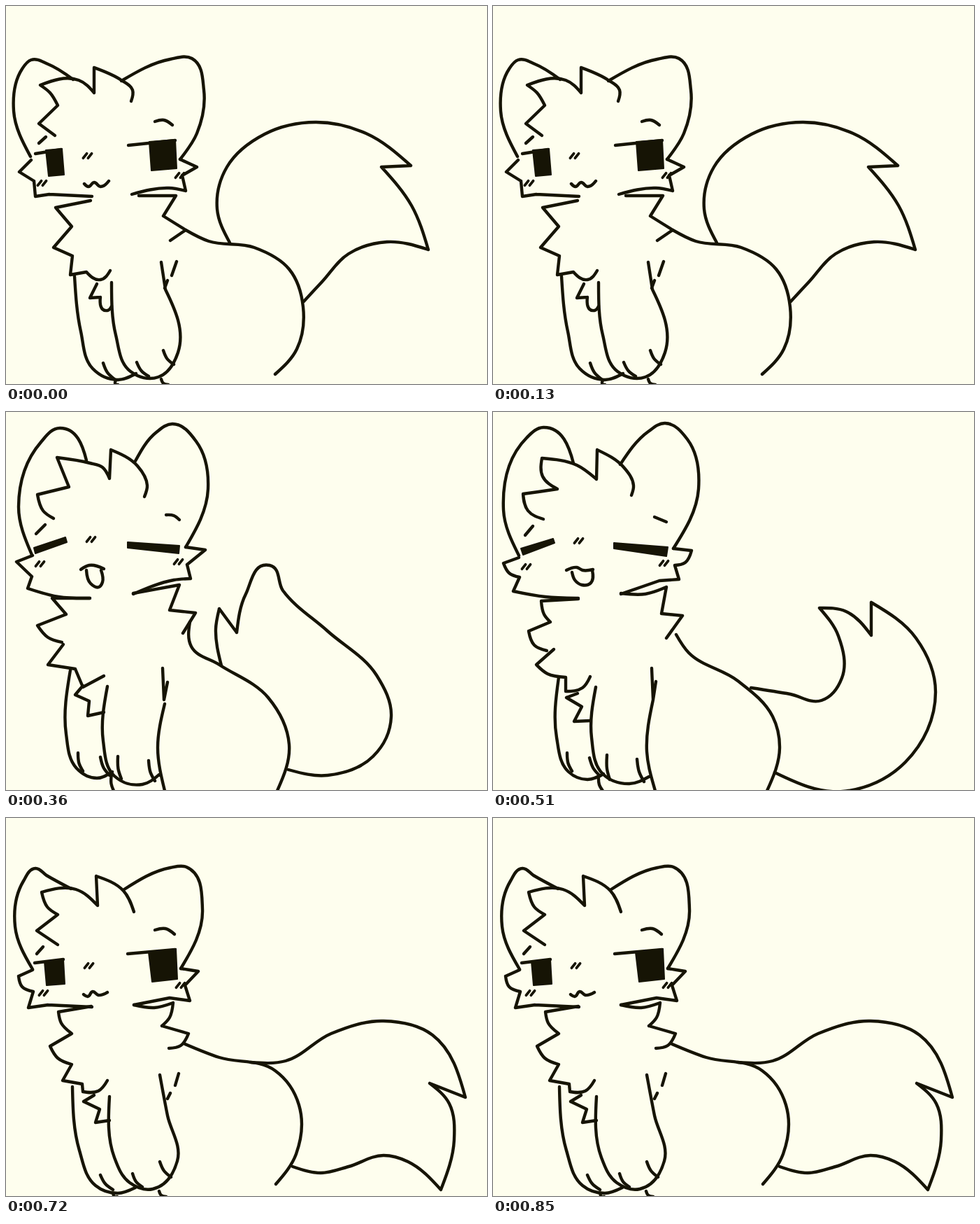
Recreate the animation shown at these times as an HTML page. Size 688x540 px, loop 0.93 s.

```html
<!DOCTYPE html>
<html lang="en">
<head>
<meta charset="utf-8">
<title>Wagging cat</title>
<style>
html, body { margin: 0; width: 100%; height: 100%; overflow: hidden; background: #fefeee; }
svg { display: block; width: 688px; height: 540px; }
path { fill: none; stroke: #161405; stroke-width: 4.4; stroke-linecap: round; stroke-linejoin: round; }
.thin { stroke-width: 3.8; }
.solid { fill: #161405; stroke-width: 2; }
</style>
</head>
<body>
<svg id="stage" viewBox="0 0 688 540"></svg>
<script>
const svgNS = "http://www.w3.org/2000/svg";
const stage = document.getElementById("stage");
const holds = [220, 140, 150, 210, 210];
const loop = holds.reduce((sum, hold) => sum + hold);

function add(parent, tag, attrs = {}) {
  const el = parent.appendChild(document.createElementNS(svgNS, tag));
  for (const key in attrs) el.setAttribute(key, attrs[key]);
  return el;
}

const views = holds.map(() => add(stage, "g"));

const mix = (a, m, b, n) => [a[0] * m + b[0] * n, a[1] * m + b[1] * n];
const dot = (a, b) => a[0] * b[0] + a[1] * b[1];
const size = a => Math.hypot(a[0], a[1]);
const unit = a => mix(a, 1 / (size(a) || 1), a, 0);
const read = text => text.trim().split(" ").map(word => word.split(",").map(Number));

// Round curve through a run of points, close to circular arcs.
function arc(pts) {
  const steps = pts.slice(1).map((p, i) => mix(p, 1, pts[i], -1));
  const lens = steps.map(size), dirs = steps.map(unit), end = dirs.length;
  const tans = pts.map((p, i) => {
    if (i === 0 || i === end) return null;
    return unit(mix(dirs[i - 1], Math.sqrt(lens[i]), dirs[i], Math.sqrt(lens[i - 1])));
  });
  const outer = (dir, tan) => tan ? unit(mix(dir, 1 + 2 * dot(dir, tan), tan, -1)) : dir;
  tans[0] = outer(dirs[0], tans[1]);
  tans[end] = outer(dirs[end - 1], end > 1 ? tans[end - 1] : null);
  const reach = (i, tan) => lens[i] * 2 / 3 / (1 + Math.max(0, dot(dirs[i], tan)));
  return "M" + pts[0] + dirs.map((dir, i) => {
    const a = mix(pts[i], 1, tans[i], reach(i, tans[i]));
    const b = mix(pts[i + 1], 1, tans[i + 1], -reach(i, tans[i + 1]));
    return "C" + [...a, ...b, ...pts[i + 1]].map(n => n.toFixed(1)).join(" ");
  }).join("");
}

// A star after a point makes a sharp tip there.
function curve(stroke) {
  const runs = stroke.split("*").map(read);
  return runs.map((run, i) => arc(i ? [runs[i - 1].at(-1), ...run] : run)).join("");
}

const polygon = stroke => "M" + stroke.trim().split(" ").join("L") + "Z";

// Two ends with a slight sag between them.
function bow(stroke) {
  const [a, b] = read(stroke);
  const mid = mix(a, 0.5, b, 0.5);
  return arc([a, [mid[0] - 2, mid[1] + 2], b]);
}

// A pair of small slanted dashes.
function dashes(stroke) {
  const [x, y] = read(stroke)[0];
  return [x, x + 7].map(cx => `M${cx + 2.5} ${y - 3.2}L${cx - 2.5} ${y + 3.2}`).join("");
}

// One text per pose; "|" separates strokes.
function part(shape, look, texts) {
  texts.forEach((text, i) => text && add(views[i], "path", { class: look, d: text.split("|").map(shape).join("") }));
}

const ears = [
  "35,215 11,150 23,90 36,77 60,83 96,105|165,107 235,76 266,75 283,120 273,182 249,219",
  "37,213 14,150 29,75* 70,80 93,101|171,102 215,78 272,69* 276,150 247,215",
  "37,204 18,135 50,43 77,23 115,69|185,70 215,29 238,17 272,42 289,110 257,193",
  "37,205 15,140 48,37 72,22 115,73|182,75 222,28 246,16 278,39 294,110 258,195",
  "38,216 13,155 25,90 42,72 58,82 93,101|169,102 235,71 258,70 281,130 250,215"
];
part(curve, "line", ears);

const hair = [
  "70,185 47,168* 74,142* 63,124 49,113* 104,106 126,124* 126,88* 165,106 181,120 179,136",
  "72,182 46,165* 76,138* 48,111* 105,102 130,122* 128,83* 168,101 183,134",
  "68,152 53,141 45,118* 90,107* 73,65* 120,73 138,79 148,95* 150,54* 188,77 202,105 198,121",
  "72,153 50,141 43,117* 65,114 92,110* 71,92 70,66* 120,76 148,96* 149,54* 187,79 201,105 198,119",
  "74,181 44,161* 74,138* 59,127 51,106* 100,102 131,125* 129,83* 168,104 183,134"
];
part(curve, "line", hair);

const rightCheek = [
  "249,219 273,230* 252,242* 257,264* 233,260 180,269",
  "247,215 262,219 273,231* 253,241* 261,252 258,263* 235,257 180,267",
  "257,193 285,197* 259,218* 264,238* 240,240 182,260",
  "258,195 284,198* 275,215 260,219* 266,239* 238,241* 183,260",
  "250,215 275,219* 256,239* 263,261* 234,257* 183,267"
];
part(curve, "line", rightCheek);

const leftCheek = [
  "36,220 19,237* 40,250* 42,272* 62,269* 123,272",
  "38,217 24,222 19,240* 38,247* 42,272* 68,266 124,270",
  "38,205 15,214* 37,235* 31,252* 75,264 120,266",
  "37,208 15,216* 23,230 38,236* 29,256* 75,264 122,266",
  "38,217 18,226* 23,241 39,248* 32,271* 60,267* 123,270"
];
part(curve, "line", leftCheek);

const brows = [
  "47,196 57,187|213,165 226,163 238,170",
  "46,194 55,184|212,161 226,159 240,167",
  "43,174 56,161|229,147 240,148 248,154",
  "46,176 57,163|231,150 248,157",
  "44,194 53,184|213,160 228,158 241,166"
];
part(curve, "line", brows);

const lids = [
  "42,211 79,205|175,199 242,192",
  "40,208 82,202|175,196 242,189",
  "", "",
  "41,207 82,202|174,194 242,188"
];
part(curve, "line", lids);

const eyes = [
  "57,206 80,204 83,241 61,243|205,194 242,191 244,232 208,235",
  "56,204 81,202 84,239 60,242|203,193 242,189 246,230 208,234",
  "40,194 85,179 87,186 42,202|174,186 248,191 247,202 174,194",
  "40,195 86,181 88,187 43,204|173,187 250,193 248,206 173,195",
  "55,205 82,202 84,237 58,239|204,192 243,187 245,230 209,234"
];
part(polygon, "solid", eyes);

const smirk = "111,252 117,255 124,248 132,253 145,249";
const mouths = [
  "112,254 118,258 126,252 135,258 147,250",
  smirk,
  "107,225 119,219 140,224|115,226 121,245 133,250 138,243 136,226",
  "105,226 120,222 128,226 143,225|113,229 117,240 127,247 139,245 142,226",
  smirk
];
part(curve, "line", mouths);

const blush = [
  "113,214|48,253|245,242",
  "115,211|52,250|247,239",
  "118,182|45,217|243,214",
  "119,184|44,221|241,216",
  "115,211|50,250|246,239"
];
part(dashes, "thin", blush);

const chest = [
  "121,278 71,288* 94,315* 68,345* 95,357* 92,384* 115,380* 135,391 149,378",
  "121,275 100,273 69,289* 97,311* 75,330 71,354* 97,355* 89,370 97,386* 115,377* 131,392* 148,375",
  "120,266 66,266* 86,289* 45,305* 60,322 80,329|82,332 60,361* 99,367* 110,393* 140,377",
  "122,267 69,270* 73,289 82,300* 51,313* 59,333 77,341|87,339 62,361* 78,374 104,379* 104,399* 128,394 139,378",
  "122,269 75,277* 79,293 94,308* 63,326* 74,343 94,352* 81,375* 109,380* 110,391* 132,390 145,375"
];
part(curve, "line", chest);

const tuft = [
  "130,397 120,417* 135,416* 145,435 151,429",
  "131,394 118,417* 133,415* 143,437* 148,430",
  "110,391 99,404* 119,413* 117,434* 140,429",
  "121,402 105,408* 127,421* 116,442* 139,441",
  "126,396 111,405* 134,416* 128,435* 148,432"
];
part(curve, "line", tuft);

const nape = [
  "190,271 243,271* 225,300* 257,320* 235,335",
  "186,271 215,267 245,271* 224,291* 245,301 262,319* 236,333",
  "182,259 248,247* 234,283* 271,287* 253,316",
  "183,259 218,260 248,250* 241,288* 271,291* 248,323",
  "183,267 212,271 239,264* 234,285 223,297* 261,308* 250,325 233,329"
];
part(curve, "line", nape);

const back = [
  "257,320 290,336 355,345 405,376 425,430 416,490 385,526",
  "258,322 290,339 350,347 408,380 426,440 415,490 386,525",
  "263,300 265,335 305,361 375,408 405,475 388,541",
  "262,318 280,344 350,384 400,435 410,480 392,541",
  "254,322 305,342 385,361 419,410 415,480 386,523"
];
part(curve, "line", back);

const farLeg = [
  "98,386 107,465 124,518 160,534 186,525",
  "97,386 103,465 125,522 160,536 183,528",
  "92,369 86,460 101,509 130,523 152,514",
  "94,379 91,465 108,514 135,525 158,517",
  "95,384 105,475 128,525 160,536 185,528"
];
part(curve, "line", farLeg);

const nearLeg = [
  "151,395 157,470 178,522 218,530 246,495 228,405* 222,366|244,365 237,385|231,392 227,403",
  "149,395 154,465 175,520 212,530 242,495 230,415 217,366|243,363 233,400",
  "145,392 139,470 155,520 195,532 219,518|224,366 226,411* 231,386|227,417 217,480 227,541",
  "147,393 141,465 157,517 195,531 223,521|227,366 229,411* 233,385|229,411 220,485 232,541",
  "148,398 155,485 177,521 210,530 245,490 231,425 220,367|247,365 242,382|235,393 231,401"
];
part(curve, "line", nearLeg);

const toes = [
  "139,510 155,533|187,509 204,529|225,492 240,512|157,535 160,541|222,533 232,541",
  "136,509 154,536|183,508 203,529|221,490 237,511|218,531 228,541",
  "103,487 110,513|135,493 148,519|160,492 165,524|204,498 213,527|151,517 154,541",
  "106,487 113,513|138,494 153,520|163,490 167,525|206,496 216,528|151,520 157,541",
  "135,510 153,531|181,508 195,527|220,491 236,513|154,536 159,541|219,533 229,541"
];
part(bow, "line", toes);

const tail = [
  "320,338 302,290 316,230 370,183 443,166 515,182 579,228* 537,230* 580,285 604,348* 545,337 490,354 452,394 426,422",
  "313,341 282,300 275,227 325,162 407,132* 396,172* 440,147 474,140 485,148 472,200 491,300 473,403 428,444",
  "308,362 300,310 305,281* 330,315* 343,260 377,219 396,255 460,313 530,376 551,435 525,492 460,519 404,511",
  "369,394 425,403 470,412 499,380 494,320 467,280* 505,285 541,319* 541,272* 605,323 633,400 590,500 500,542 403,515",
  "350,349 400,347 465,308 540,290 610,310 657,399* 606,379* 634,408 641,460 622,531* 575,491 540,482 490,498 450,507 410,498"
];
part(curve, "line", tail);

function draw(time) {
  let t = time % loop, now = 0;
  while (t >= holds[now]) t -= holds[now++];
  views.forEach((view, i) => view.style.display = i === now ? "" : "none");
}

const start = performance.now();
function tick() {
  draw(Math.max(0, performance.now() - start));
  requestAnimationFrame(tick);
}
tick();
</script>
</body>
</html>
```
